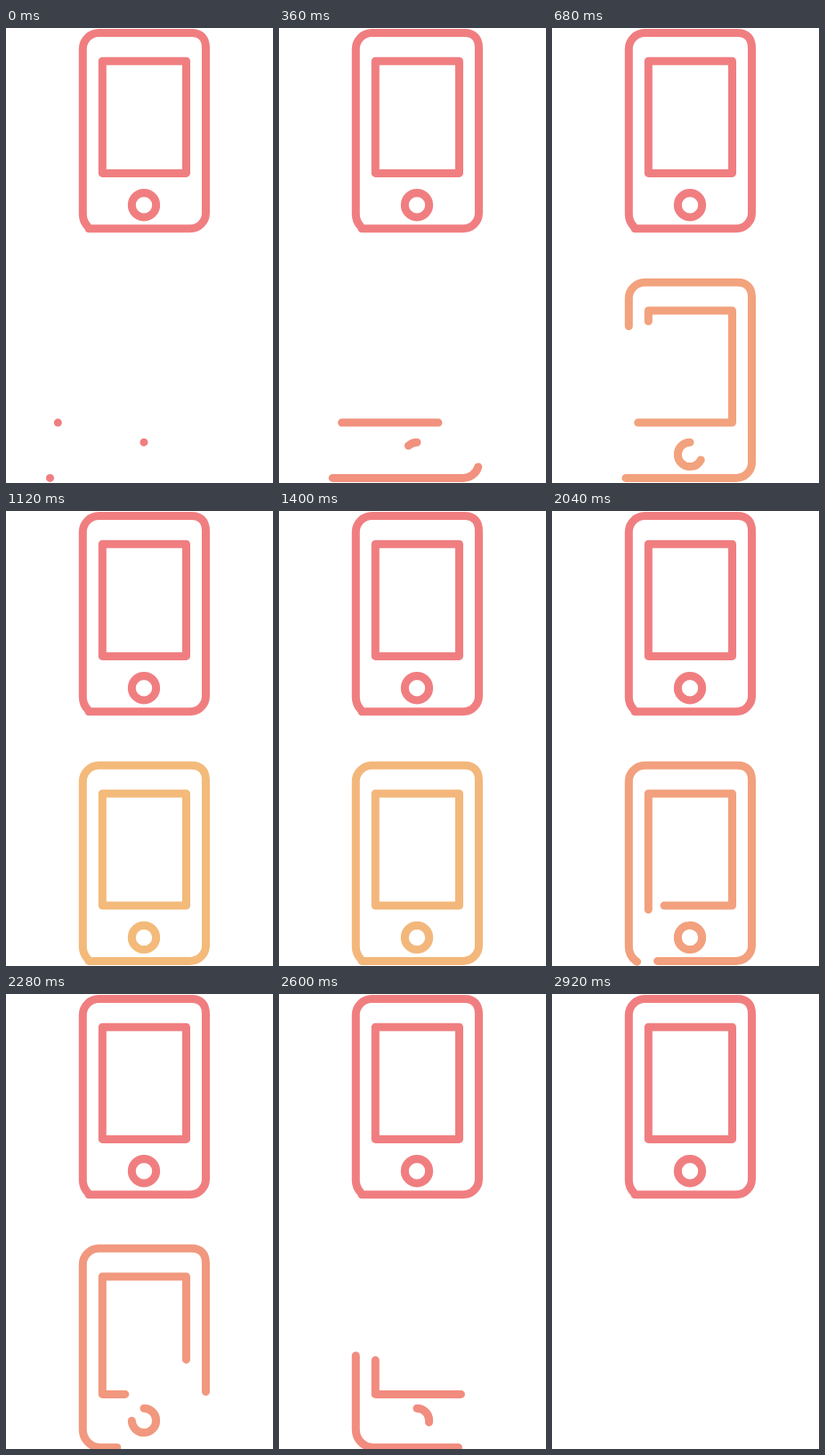
Write an HTML page that moves like this. It is 300 px wide and 512 px high and loops after 3 s.

```html
<!DOCTYPE html>
<html lang="en">
<head>
<meta charset="utf-8">
<title>Phone line loader</title>
<style>
  html, body { margin: 0; width: 100%; height: 100%; overflow: hidden; background: #fff; }
  svg { display: block; width: 300px; height: 512px; }
  path { fill: none; stroke-width: 9; stroke-linecap: round; stroke-linejoin: round; }
</style>
</head>
<body>
<svg viewBox="0 0 300 512">
  <g id="still" transform="translate(0 -280.7)"></g>
  <g id="moving"></g>
</svg>
<script>
const LOOP = 3000;
const DRAW = { from: 0, to: 1000, ease: bezierEase(0.45, 0.6) };
const ERASE = { from: 1890, to: 2920, ease: bezierEase(0.5, 0.7) };
const PINK = [240, 126, 128], AMBER = [243, 190, 122], PEAK = 1200;

// Each line enters along `lead`, rests as a closed shape, and leaves along `out`.
const PARTS = [
  { lead: 43.5, out: 160, drawPower: 1, erasePower: 1,
    d: 'M49.5 506.4H207A17.5 17.5 0 0 0 224.5 488.9V303C224.5 292 219 286.3 208.5 286.3' +
       'H104.3A18 18 0 0 0 86.3 304.3V490.3A20 20 0 0 0 106.3 510.3H249.5' },
  { lead: 50, out: 147.5, drawPower: 1, erasePower: 1,
    d: 'M58.3 444.1H202.5V318H108.3V450.4H249.5' },
  { lead: 0, out: 0, drawPower: 1.5, erasePower: 0.9,
    d: 'M155 466.2A13.7 13.7 0 0 0 155 493.6A13.7 13.7 0 0 0 155 466.2' }
];

// Cubic Bezier easing with control heights 0 and 1.
function bezierEase(x1, x2) {
  return x => {
    let lo = 0, hi = 1;
    for (let i = 0; i < 24; i++) {
      const u = (lo + hi) / 2, v = 1 - u;
      if (3 * x1 * u * v * v + 3 * x2 * u * u * v + u * u * u < x) lo = u; else hi = u;
    }
    return lo * lo * (3 - 2 * lo);
  };
}

const mix = (a, b, k) => a + (b - a) * k;

function phase({ from, to, ease }, t) {
  if (t <= from) return 0;
  return t >= to ? 1 : ease((t - from) / (to - from));
}

function colorAt(t) {
  const k = t < PEAK ? t / PEAK : (LOOP - t) / (LOOP - PEAK);
  return `rgb(${PINK.map((c, i) => Math.round(mix(c, AMBER[i], k)))})`;
}

function addPath(parent, part) {
  const path = document.createElementNS('http://www.w3.org/2000/svg', 'path');
  path.setAttribute('d', part.d);
  document.getElementById(parent).append(path);
  return { ...part, path, length: path.getTotalLength() };
}

function showPart({ path, length, lead, out, drawPower, erasePower }, drawn, erased) {
  const a = drawn ** drawPower, b = erased ** erasePower;
  const tail = erased ? mix(lead, length, b) : lead * a;
  const head = erased ? mix(length - out, length, b) : (length - out) * a;
  path.style.display = drawn > 0 && erased < 1 ? '' : 'none';
  path.style.strokeDasharray = `${Math.max(head - tail, 0.01)} 9999`;
  path.style.strokeDashoffset = -tail;
}

const moving = PARTS.map(part => addPath('moving', part));
PARTS.forEach(part => showPart(addPath('still', part), 1, 0));
document.getElementById('still').style.stroke = `rgb(${PINK})`;

function render(t) {
  const drawn = phase(DRAW, t), erased = phase(ERASE, t);
  document.getElementById('moving').style.stroke = colorAt(t);
  moving.forEach(part => showPart(part, drawn, erased));
}

const start = performance.now();
function tick() {
  render((performance.now() - start) % LOOP);
  requestAnimationFrame(tick);
}
render(0);
requestAnimationFrame(tick);
</script>
</body>
</html>
```
